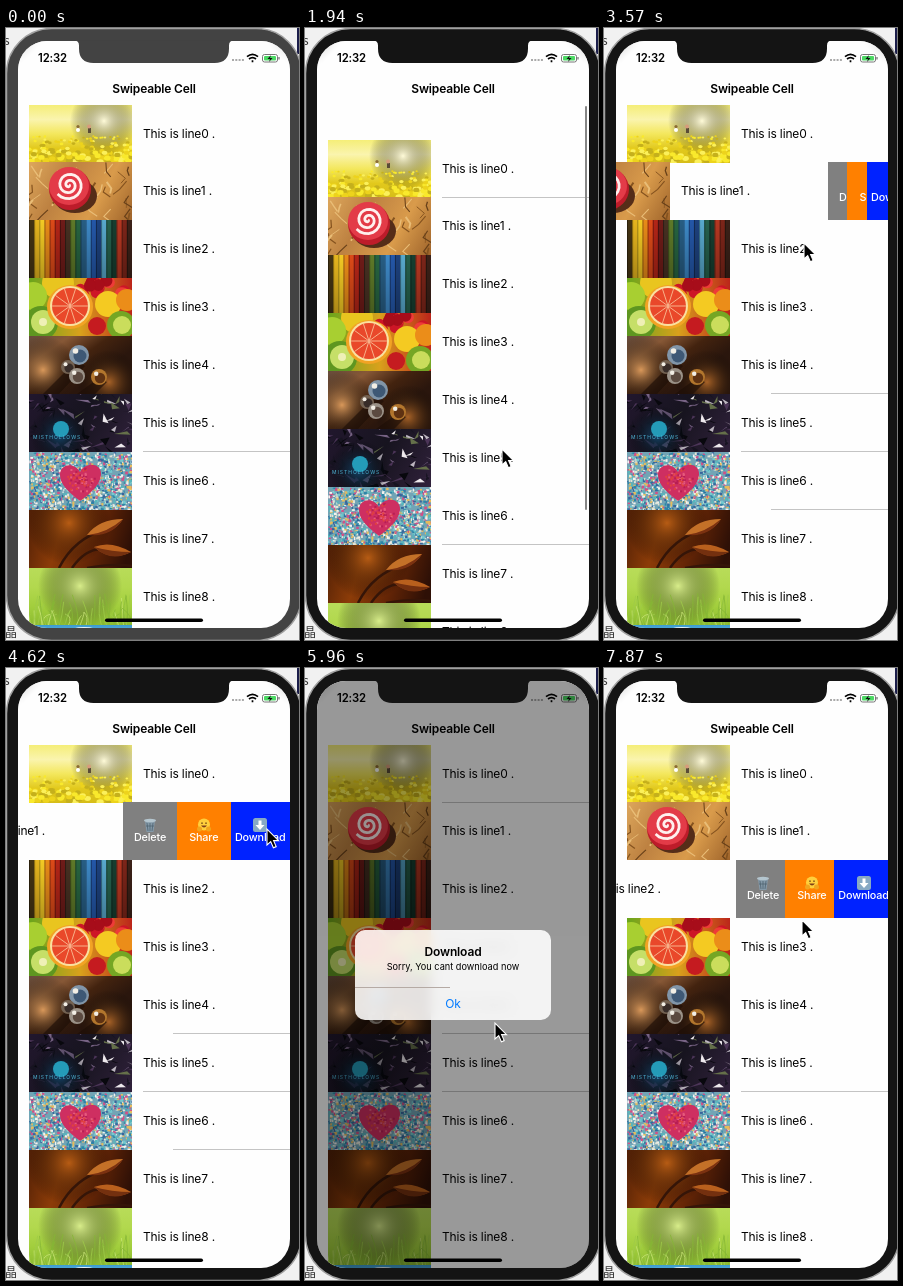
These frames come from a looping animation (293x612 px, 8000 ms). An HTML page with a canvas:

```html
<!DOCTYPE html>
<html lang="en">
<head>
<meta charset="utf-8">
<title>Swipeable Cell</title>
<style>
  html, body { margin: 0; width: 100%; height: 100%; overflow: hidden; background: #f1f1f1; }
  #stage { position: relative; width: 293px; height: 612px; overflow: hidden; font: 12px/16px Inter, sans-serif; letter-spacing: -.15px; color: #000; }
  #stage div, #stage svg, .thumb { position: absolute; }
  .full { left: 0; top: 0; width: 293px; height: 612px; }
  #screen { clip-path: inset(13px 9px 12px 12px round 29px); background: #fefefe; }
  .row { left: 0; width: 293px; height: 58px; overflow: hidden; }
  .content { left: 0; top: 0; width: 293px; height: 58px; }
  .thumb { left: 23px; top: 0; }
  .content span { position: absolute; left: 137px; top: 21px; white-space: pre; }
  .line { height: 1px; right: 9px; background: #c4c4c4; }
  .action { top: 0; height: 58px; overflow: hidden; color: #fff; font-size: 10.8px; font-weight: 500; }
  .action div { left: 0; top: 0; height: 58px; text-align: center; }
  .action span { position: absolute; left: 0; right: 0; top: 28px; }
  .action svg { left: 50%; top: 16px; margin-left: -7px; width: 14px; height: 14px; }
  #nav { left: 0; top: 0; width: 293px; height: 77px; background: rgba(254,254,254,.8); backdrop-filter: blur(6px) saturate(1.8) brightness(1.1); }
  #nav b { position: absolute; left: 12px; width: 272px; top: 53px; text-align: center; font-weight: 600; }
  #nav i { position: absolute; left: 32px; top: 22px; font: 600 11.3px/16px Inter, sans-serif; }
  #bar { left: 280px; width: 2px; border-radius: 1px; background: #858585; }
  #dim { background: rgba(0,0,0,.4); }
  #alert { left: 50px; top: 262px; width: 196px; height: 90px; border-radius: 10px; text-align: center; background: rgba(255,255,255,.88); backdrop-filter: blur(6px) saturate(1.8); }
  #alert div { left: 0; width: 100%; }
  #alert hr { position: absolute; left: 0; top: 57px; width: 95px; height: 1px; margin: 0; border: 0; background: #b5aaa4; }
</style>
</head>
<body>
<div id="stage">
  <svg class="full" viewBox="0 0 293 612">
    <rect x="291" width="2" height="26" fill="#1b1d4a"/>
    <g font-family="Noto Sans CJK SC, Noto Sans CJK, sans-serif" fill="#333">
      <text x="-2" y="17" font-size="12">s</text>
      <text x="-1" y="609" font-size="12">晶</text>
    </g>
    <rect class="shell" x=".5" y=".5" width="295" height="612" rx="45" stroke="#a0a0a0" stroke-width="1.5"/>
  </svg>
  <div id="screen" class="full">
    <div id="list" class="full"></div>
    <div id="nav"><i>12:32</i><b>Swipeable Cell</b></div>
    <svg class="full" viewBox="0 0 293 612">
      <path d="M226 32h12" stroke="#aaa" stroke-width="2" stroke-dasharray="2 1.3"/>
      <g fill="none" stroke="#000" stroke-width="1.7">
        <path d="M241 28.6q5.500 -4.600 11 0M243 31q3.500 -2.800 7 0"/>
        <path d="M246.500 32.200v2"/>
      </g>
      <rect x="256.500" y="26.500" width="15" height="7.500" rx="2" fill="#fff" stroke="#777"/>
      <rect x="258" y="28" width="12" height="4.500" rx="1" fill="#4cd964"/>
      <path d="M273 29v2.500" stroke="#777" stroke-width="1.300"/>
      <path d="M265 27l-3.500 4h2.500l-1 3 3.500-4h-2.500z" fill="#111"/>
    </svg>
    <div id="bar"></div>
    <div id="dim" class="full"></div>
    <div id="alert">
      <div style="top:14px;font-weight:600">Download</div>
      <div style="top:29px;font-size:9.2px;letter-spacing:0">Sorry, You cant download now</div>
      <hr>
      <div style="top:66px;color:#007aff">Ok</div>
    </div>
  </div>
  <svg class="full" viewBox="0 0 293 612">
    <path class="shell" d="M68 12.500q5 0 5 5v3q0 14.500 14.500 14.500h121q14.500 0 14.500-14.500v-3q0-5 5-5z"/>
    <rect x="99" y="590.500" width="98" height="3.500" rx="1.750"/>
    <path id="cursor" d="M0 0V16L3.700 12.600 6.400 18.800 9.200 17.600 6.600 11.600H11.500Z" stroke="#fff" stroke-width="1.100"/>
  </svg>
</div>
<script>
const $ = id => document.getElementById(id);
const LOOP = 8000, W = 103, H = 58, TOP = 76.6, PITCH = 57.87;
const RIGHT = 284, OPEN = 167, MAX_SCROLL = 78;

function add(parent, cls, html = '') {
  const el = document.createElement('div');
  el.className = cls;
  el.innerHTML = html;
  return parent.appendChild(el);
}

function seeded(seed) {
  return (a = 1, b = 0) => {
    seed = (seed * 16807) % 2147483647;
    return b + (a - b) * seed / 2147483647;
  };
}

/* Thumbnails */
function painter(ctx, seed) {
  const rnd = seeded(seed);
  const p = {
    rnd,
    pick: list => list[Math.floor(rnd(list.length))],
    rect(c, x, y, w, h) { ctx.fillStyle = c; ctx.fillRect(x, y, w, h); },
    disc(c, x, y, r, ry = r) {
      ctx.fillStyle = c;
      ctx.beginPath(); ctx.ellipse(x, y, r, ry, 0, 0, 7); ctx.fill();
    },
    shape(c, d) { ctx.fillStyle = c; ctx.fill(new Path2D(d)); },
    stroke(c, w, d) { ctx.strokeStyle = c; ctx.lineWidth = w; ctx.stroke(new Path2D(d)); },
    fade(colors, x = 0, y = H) {
      const g = ctx.createLinearGradient(0, 0, x, y);
      colors.forEach((c, i) => g.addColorStop(i / (colors.length - 1), c));
      p.rect(g, 0, 0, W, H);
    },
    glow(c, x, y, r) {
      const g = ctx.createRadialGradient(x, y, 0, x, y, r);
      g.addColorStop(0, c); g.addColorStop(1, 'transparent');
      p.rect(g, 0, 0, W, H);
    },
    times(n, fn) { for (let i = 0; i < n; i++) fn(i); }
  };
  return p;
}

const pictures = [
  function flowerField(p) {
    p.fade(['#f5ee78', '#faf4ae', '#f3e75c', '#e2c91c', '#d6bd18']);
    p.glow('#fffbd8', 75, 16, 34);
    p.times(150, () => {
      const y = p.rnd(57, 31);
      p.disc(p.pick(['#f9e92c', '#edd31c', '#c5b01c', '#fbf05a']), p.rnd(W), y, 1 + (y - 30) / 10, .8 + (y - 30) / 14);
    });
    p.disc('#fff', 49, 25, 2); p.disc('#8b6c35', 49, 21.5, 1.6);
    p.rect('#594b36', 59, 23, 3, 5); p.disc('#d79b7c', 60, 21.500, 2);
  },
  function candy(p) {
    p.fade(['#dda75c', '#bd8141', '#d99b4b', '#9f642b'], W, H);
    p.times(32, () => {
      const x = p.rnd(W), y = p.rnd(H);
      p.stroke(p.pick(['#684019', '#e9bd77', '#85531f']), p.rnd(2, .7),
        `M${x} ${y}l${p.rnd(8, -8)} ${p.rnd(10, 3)} ${p.rnd(8, -8)} 5`);
    });
    p.disc('#552d18', 46, 34, 22, 17);
    p.disc('#bd1c2a', 41, 27, 21); p.disc('#e33b48', 40, 24, 20, 19);
    let d = 'M40 23';
    p.times(48, i => {
      const a = i * .32, r = i * .31;
      d += `L${40 + r * Math.cos(a)} ${23 + r * Math.sin(a)}`;
    });
    p.stroke('#fff0ee', 2.800, d);
  },
  function pencils(p) {
    const colors = ['#443413', '#e5b51e', '#f3ca24', '#e88b18', '#dc4a18', '#b32517', '#6e1b18', '#473022', '#5e7928',
      '#276440', '#275d83', '#3d88c5', '#2457a8', '#1d417d', '#58a9cd', '#25604c', '#173e30', '#b53721', '#7d2519', '#3b2118'];
    const w = W / colors.length;
    colors.forEach((c, i) => {
      p.rect(c, i * w, 0, w + 1, H);
      p.rect('rgba(0,0,0,.35)', i * w, 0, 1, H);
    });
    p.fade(['transparent', 'rgba(0,0,0,.25)']);
  },
  function fruit(p) {
    p.fade(['#69a51c', '#d9a11c', '#bc251a'], W, 0);
    p.disc('#e9c51f', 29, 5, 16); p.disc('#a8cf31', 4, 18, 14);
    p.disc('#5e9620', 12, 45, 17); p.disc('#c6df68', 14, 44, 12); p.disc('#eff0b6', 14, 44, 4);
    p.times(14, () => p.disc(p.pick(['#cd1627', '#a70d1a', '#ee3b38']), p.rnd(100, 48), p.rnd(19, 2), 6));
    p.disc('#f4ca22', 79, 26, 13); p.disc('#eb8d19', 98, 22, 11);
    p.disc('#c51b20', 68, 48, 9); p.disc('#75a624', 92, 47, 14); p.disc('#cadd5c', 93, 47, 9);
    p.disc('#f2a324', 41, 29, 23, 22); p.disc('#fae0a0', 41, 28, 20); p.disc('#e9482a', 41, 28, 18);
    p.times(10, i => {
      const a = i * Math.PI / 5;
      p.stroke('#f8b28a', 1, `M41 28L${41 + 18 * Math.cos(a)} ${28 + 18 * Math.sin(a)}`);
    });
  },
  function marbles(p) {
    p.fade(['#654b3b', '#875836', '#43230f', '#2a160d'], W * .4, H);
    p.glow('#d9985a', 14, 34, 34); p.glow('#a76227', 80, 46, 32);
    p.shape('rgba(30,14,7,.65)', 'M48 24L14 58H30L56 30ZM70 42L48 58H66L78 46Z');
    [[50, 19, 10], [39, 31, 7], [48, 40, 8], [70, 41, 8]].forEach(([x, y, r], i) => {
      p.disc(['#8195a8', '#736252', '#9b9288', '#b2762d'][i], x, y, r);
      p.disc(['#3e5875', '#372c28', '#5b4a40', '#5f3212'][i], x + 1, y + 1, r * .65);
      p.disc('#f2eee5', x - r * .35, y - r * .4, r * .28);
    });
  },
  function shards(p) {
    p.fade(['#21172d', '#17141f', '#30213b'], W, H);
    p.times(95, () => {
      const x = p.rnd(W), y = p.rnd(H), c = ['#08080d', '#4c3558', '#776384', '#171421'];
      p.shape(p.pick(x > 50 ? c.concat('#bdb6c0', '#eee9ed', '#65704a') : c),
        `M${x} ${y}l${p.rnd(14, -10)} ${p.rnd(9, -7)} ${p.rnd(6, -4)} ${p.rnd(7, -3)}z`);
    });
    p.glow('#15466b', 31, 41, 30);
    p.disc('#249bb8', 32, 35, 8);
  },
  function heart(p) {
    p.rect('#72a4b5', 0, 0, W, H);
    const specks = (n, colors) => p.times(n, () => p.rect(p.pick(colors), p.rnd(W), p.rnd(H), p.rnd(3, 1), p.rnd(3, 1)));
    specks(1500, ['#2c85a8', '#57b7bd', '#e4e4d6', '#d24f87', '#37669d', '#e6bb5d', '#75c9cf', '#f2f2ef']);
    p.shape('#ce2f61', 'M51 49C41 41 31 33 31 23C31 11 46 10 51 20C56 10 73 10 72 23C71 33 61 42 51 49Z');
    p.times(90, () => {
      const a = p.rnd(6.28), r = p.rnd(14);
      p.rect(p.pick(['#e65a7c', '#b71e54', '#e1413d']), 51 + r * Math.cos(a), 27 + r * Math.sin(a), 2, 2);
    });
  },
  function buds(p) {
    p.fade(['#522006', '#8c3c08', '#642506', '#2e1006'], W, H * .5);
    p.glow('#b75c14', 40, 13, 42);
    p.stroke('#351508', 2.500, 'M30 58Q45 28 78 19M43 58Q62 31 86 43M58 58Q85 53 103 56');
    p.shape('#c47128', 'M58 25Q70 9 94 9Q83 26 58 25Z');
    p.shape('#7b3110', 'M59 25Q78 23 94 9Q83 27 59 25Z');
    p.shape('#b9601d', 'M65 37Q82 30 102 42Q82 52 65 37Z');
    p.shape('#74300f', 'M65 37Q83 42 102 42Q82 53 65 37Z');
  },
  function grass(p) {
    p.fade(['#b8dc59', '#b2d84e', '#a2ce3d', '#8cbb30']);
    p.glow('#d8ed8a', 51, 18, 42);
    p.times(55, () => {
      const x = p.rnd(W);
      p.stroke(p.pick(['#c8e477', '#86b635', '#9fcb4a']), .8, `M${x} 58q${p.rnd(5, -5)} -10 ${p.rnd(9, -9)} ${-p.rnd(34, 10)}`);
    });
  },
  function seaside(p) {
    p.fade(['#3b9bd0', '#a6d7ec', '#e8f0ec', '#beb69f']);
    p.disc('#f3f8fa', 22, 12, 18, 6); p.disc('#e6f3f8', 55, 7, 15, 5);
    p.rect('#3b9fc2', 0, 27, 55, 11);
    p.shape('#cfc5ad', 'M0 58V41L38 36H103V58Z');
    p.shape('#ded0b5', 'M67 45V16L82 7L103 13V47Z');
    p.shape('#9d7052', 'M64 18L81 5L103 9V16L82 11Z');
    p.rect('#76614f', 76, 25, 6, 10); p.rect('#81705c', 91, 24, 6, 21);
    p.stroke('#695b44', 3, 'M49 42V22');
    p.disc('#55784b', 50, 18, 10, 8); p.disc('#77965a', 46, 16, 6, 4);
    p.times(22, () => p.disc(p.pick(['#7f8b61', '#8c8378', '#e4dac8', '#9aa0a0']), p.rnd(90), p.rnd(56, 40), 4, 2.500));
  }
];

const list = $('list');
const rows = pictures.map((paint, i) => {
  const el = add(list, 'row');
  const content = add(el, 'content', `<canvas class="thumb" width="${W}" height="${H}"></canvas><span>This is line${i} .</span>`);
  const ctx = content.firstChild.getContext('2d');
  paint(painter(ctx, 971 * (i + 3)));
  if (i === 5) {
    ctx.font = '5px Inter, sans-serif';
    ctx.letterSpacing = '1px';
    ctx.fillStyle = '#4fb6d8';
    ctx.fillText('MISTHOLLOWS', 4, 45);
  }
  return { el, content };
});

/* Swipe buttons */
const icons = {
  trash: '<path d="M2 3h10l-1.500 11h-7z" fill="#8499a8"/><path d="M4 5l1 8M7 5v8M10 5l-1 8M3 8h8" stroke="#4e6370" stroke-width=".8"/><ellipse cx="7" cy="2.500" rx="6" ry="1.800" fill="#b4c5ce"/>',
  hug: '<circle cx="7" cy="6.500" r="6" fill="#ffcf3c"/><path d="M4 5.500q1-1.500 2 0M8 5.500q1-1.500 2 0" stroke="#6b4310" fill="none"/><path d="M4 7.500h6q-3 4-6 0" fill="#804018"/><circle cx="2.500" cy="11" r="2.500" fill="#f2a51d"/><circle cx="11.500" cy="11" r="2.500" fill="#f2a51d"/>',
  down: '<rect width="14" height="14" rx="2.500" fill="#87a9c4"/><path d="M5.500 2.500h3v4.500h3l-4.500 5-4.500-5h3z" fill="#fff"/>'
};
const drawer = add(list, 'row');
const actions = [
  ['Delete', 'trash', '#808080', 54],
  ['Share', 'hug', '#ff8000', 53.5],
  ['Download', 'down', '#0022ff', 59.5]
].map(([label, icon, color, width]) => {
  const el = add(drawer, 'action', `<div style="width:${width}px"><svg viewBox="0 0 14 14">${icons[icon]}</svg><span>${label}</span></div>`);
  el.style.background = color;
  return { el, width };
});
const lines = [0, 1, 2].map(() => add(list, 'line'));

/* Motion: [step, value, ...] with straight runs between the keys */
const scrollKeys = [[-1, 0], [0, 18], [1, 60], [2, 100], [3, 111.5], [4, 95], [5, 80], [6, 72], [7, 20], [8, -35], [9, -24], [10, -9], [12, -.5], [13, 0]];
const barKeys = [[-1, 0], [0, 1], [13, 1], [15, 0]];
const swipeKeys = {
  1: [[15, 0], [16, 8], [19, 60], [21, 120], [23, 164], [26, OPEN], [28, OPEN], [30, 0]],
  2: [[43, 0], [44, 10], [46, 55], [47, 105], [48, 152]]
};
const alertKeys = [[28, 0], [30, 1], [38, 1], [40, 0]];
const cursorKeys = [[0, 140, 400], [1, 143, 340], [2, 147, 285], [3, 150, 265], [5, 165, 300], [6, 172, 330], [7, 186, 375],
  [8, 197, 421], [9, 192, 380], [10, 183, 270], [12, 162, 125], [15, 255, 150], [16, 248, 165], [19, 200, 215], [22, 165, 256],
  [23, 180, 242], [25, 245, 175], [26, 261, 161], [28, 268, 166], [29, 276, 185], [32, 255, 280], [35, 190, 355], [37, 150, 338],
  [38, 150, 338], [43, 268, 208], [46, 225, 235], [48, 198, 252]];
/* Hairlines that survive at each stage; a negative edge is a shortened line */
const lineStages = [[0, [6]], [6, [7]], [10, [1, 7]], [14, [3]], [28, [-5, 6, -7]], [40, [1, 5, 6]], [99, [6]]];

function at(keys, n) {
  const i = keys.findIndex(k => k[0] > n);
  if (i === 0) return keys[0].slice(1);
  if (i < 0) return keys[keys.length - 1].slice(1);
  const a = keys[i - 1], b = keys[i], u = (n - a[0]) / (b[0] - a[0]);
  return a.slice(1).map((v, j) => v + (b[j + 1] - v) * u);
}

function drawList(n, scroll) {
  const edge = i => TOP + PITCH * i - scroll;
  rows.forEach(({ el, content }, i) => {
    const shift = swipeKeys[i] ? at(swipeKeys[i], n)[0] : 0;
    el.style.top = Math.round(edge(i)) + 'px';
    content.style.left = -shift + 'px';
  });

  const open = n < 35 ? 1 : 2;
  const shift = at(swipeKeys[open], n)[0];
  drawer.style.top = Math.round(edge(open)) + 'px';
  drawer.style.display = shift ? '' : 'none';
  let x = RIGHT - shift;
  actions.forEach(({ el, width }) => {
    const w = width * shift / OPEN;
    el.style.left = x + 'px';
    el.style.width = w + 'px';
    x += w;
  });

  const shown = lineStages.find(s => n < s[0])[1];
  lines.forEach((line, i) => {
    const k = shown[i];
    line.style.display = k ? '' : 'none';
    if (!k) return;
    line.style.left = (k < 0 ? 167 : 137) + 'px';
    line.style.top = Math.floor(edge(Math.abs(k)) - .3) + 'px';
  });
}

function drawBar(n, scroll) {
  const over = Math.max(0, -scroll, scroll - MAX_SCROLL);
  const inside = Math.min(MAX_SCROLL, Math.max(0, scroll));
  const top = 78 + inside / MAX_SCROLL * 60 + (scroll > MAX_SCROLL ? over : 0);
  Object.assign($('bar').style, { top: top + 'px', height: 439 - over + 'px', opacity: at(barKeys, n)[0] });
}

function draw(t) {
  const n = Math.max(-1, Math.floor((t - 740) / 148.4));
  const scroll = at(scrollKeys, n)[0];
  drawList(n, scroll);
  drawBar(n, scroll);

  const shade = at(alertKeys, n)[0];
  $('dim').style.opacity = $('alert').style.opacity = shade;
  $('alert').style.display = shade ? '' : 'none';
  $('alert').style.transform = n < 30 ? `scale(${1.15 - .15 * shade})` : 'none';

  $('cursor').style.display = n < 0 ? 'none' : '';
  $('cursor').setAttribute('transform', `translate(${at(cursorKeys, n)})`);
  document.querySelectorAll('.shell').forEach(s => s.setAttribute('fill', n < 0 ? '#434343' : '#141414'));
}

const start = performance.now();
function tick() {
  draw((performance.now() - start) % LOOP);
  requestAnimationFrame(tick);
}
tick();
</script>
</body>
</html>
```
